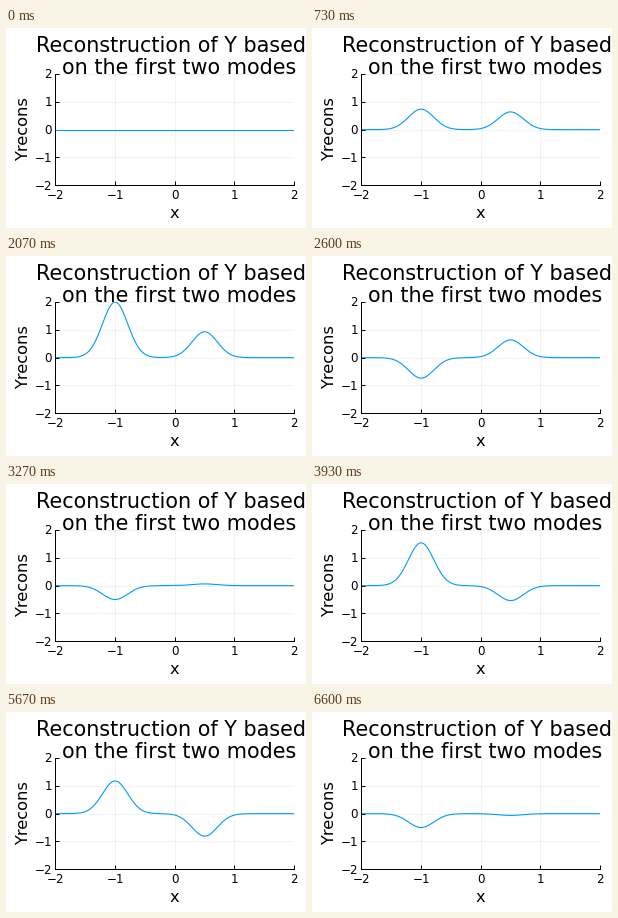
These frames come from a looping animation (300x200 px, 6670 ms). A matplotlib script:

```python
import numpy as np
import matplotlib.pyplot as plt
from matplotlib.animation import FuncAnimation

W, H, DPI = 300, 200, 100
LOOP = 6670
POSES = 100
TICKS = 3  # animation ticks per pose
LEFT, RIGHT, TOP, BOTTOM = 49.4, 288.2, 46, 157.3
PT = 72 / DPI

plt.rcParams["font.family"] = "DejaVu Sans"

fig = plt.figure(figsize=(W / DPI, H / DPI), dpi=DPI, facecolor="white")
ax = fig.add_axes([LEFT / W, 1 - BOTTOM / H, (RIGHT - LEFT) / W, (BOTTOM - TOP) / H])
ax.set(xlim=(-2, 2), ylim=(-2, 2))
ax.patch.set_visible(False)
ax.set_axisbelow(True)
ax.grid(color="black", alpha=0.1, lw=0.5 * PT)

ticks = range(-2, 3)
ax.set_xticks(ticks, [""] * 5)
ax.set_yticks(ticks, [""] * 5)
ax.tick_params(direction="in", length=4 * PT, width=PT)
for side in ("top", "right"):
    ax.spines[side].set_visible(False)
for side in ("left", "bottom"):
    ax.spines[side].set_linewidth(PT)


def label(x, y, text, size, ha="center", **kw):
    """Place text by its baseline, in pixels from the top left."""
    fig.text(x / W, 1 - y / H, text, fontsize=size * PT, ha=ha, va="baseline", **kw)


label(30, 24, "Reconstruction of Y based", 20.8, ha="left")
label(55.7, 46.3, "on the first two modes", 20.8, ha="left")
label(168.5, 190, "x", 16.3)
label(22.3, 101.5, "Yrecons", 16.3, rotation=90, rotation_mode="anchor")

for v in ticks:
    name = str(v).replace("-", "\u2212")
    label(LEFT + (v + 2) / 4 * (RIGHT - LEFT), 171, name, 11.9)
    label(46, BOTTOM - (v + 2) / 4 * (BOTTOM - TOP) + 4.5, name, 11.9, ha="right")


def bump(center, width=0.3):
    return np.exp(-((x - center) / width) ** 2)


x = np.linspace(-2, 2, 201)
left_mode, right_mode = 2 * bump(-1), bump(0.5)
curve, = ax.plot(x, 0 * x, color="#009AFA", lw=1.1 * PT)


def update(tick):
    # Each pose starts one tick early so it is settled at its nominal time.
    phase = 2 * np.pi * ((tick + 1) // TICKS) / POSES
    curve.set_ydata(left_mode * np.sin(4 * phase) + right_mode * np.sin(phase))
    return curve,


anim = FuncAnimation(fig, update, frames=POSES * TICKS, interval=LOOP / (POSES * TICKS),
                     repeat=True, repeat_delay=0, blit=False)
plt.show()
```
